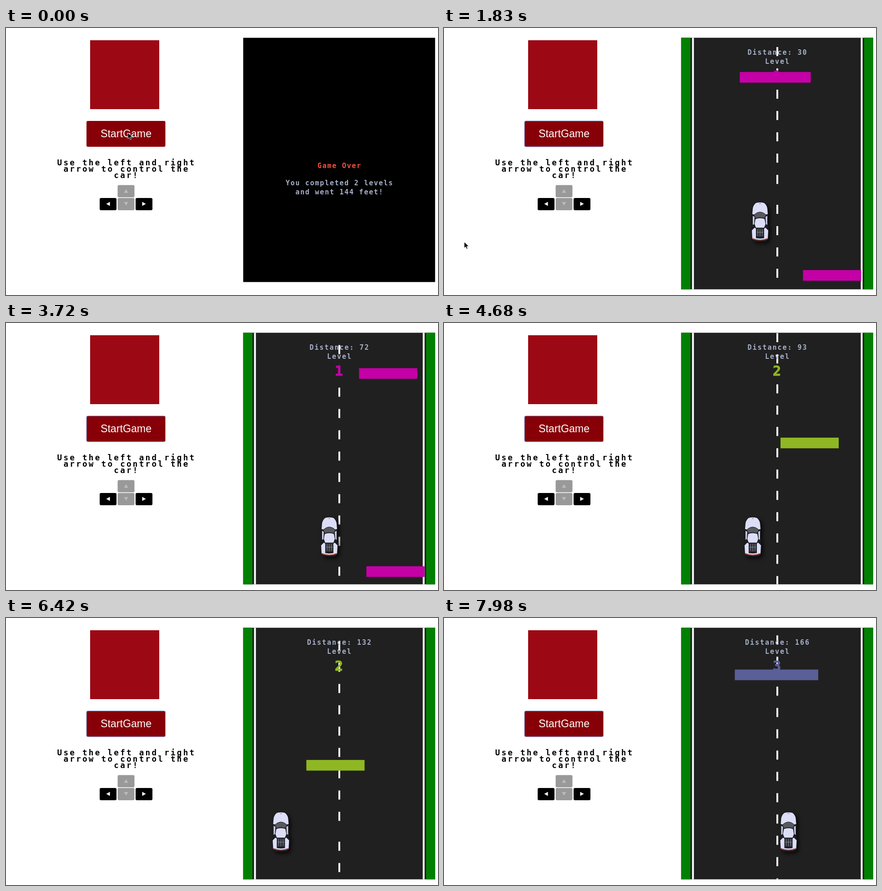
Animation of 950 by 589 pixels, one loop 8 s. Source, as an HTML page:

```html
<!DOCTYPE html>
<html lang="en">
<head>
<meta charset="utf-8">
<title>Racing game</title>
<style>
  html, body { margin: 0; width: 100%; height: 100%; overflow: hidden; background: #fff; }
  svg { display: block; width: 950px; height: 589px; }
  text { text-anchor: middle; white-space: pre; }
  .pixel { font: bold 15px "DejaVu Sans Mono", monospace; letter-spacing: 1.97px; fill: #a6b0c8; }
  .over { letter-spacing: 1.75px; }
  .help { font-size: 17.5px; letter-spacing: 3.32px; fill: #000; }
  .number { font: bold 30px "DejaVu Sans Mono", monospace; stroke-width: 1px; }
  .start { font: 23.2px "Liberation Sans", Arial, sans-serif; fill: #fff; }
  #car { filter: drop-shadow(4px 4px 4px rgba(0, 0, 0, .75)); }
</style>
</head>
<body>
<svg viewBox="0 0 950 589">
  <defs><clipPath id="screen"><rect x="521.6" y="21.6" width="422" height="555"/></clipPath></defs>

  <rect x="185" y="27" width="152" height="152" fill="#9c0914"/>
  <rect id="button" x="177" y="205" width="173.5" height="57" rx="3" fill="#870007"/>
  <text class="start" x="264" y="241">StartGame</text>
  <text class="pixel help" x="265" y="303">Use the left and right</text>
  <text class="pixel help" x="265" y="317">arrow to control the</text>
  <text class="pixel help" x="265" y="331">car!</text>
  <g id="keys"></g>

  <g id="over">
    <rect x="521.6" y="21.6" width="422" height="538.8"/>
    <text class="pixel over" x="733.5" y="309" style="fill:#f8513c">Game Over</text>
    <text class="pixel over" x="733.5" y="347">You completed 2 levels</text>
    <text class="pixel over" x="733.5" y="367">and went 144 feet!</text>
  </g>

  <g id="game" clip-path="url(#screen)">
    <rect x="521" y="21" width="423" height="556" fill="#202020"/>
    <path d="M521 21H541.800V577H521zM924 21H944V577H924z" fill="#008000"/>
    <path d="M545.500 21h4v556h-4zM916.500 21h4v556h-4z" fill="#fff"/>
    <g id="dashes" fill="#fff"></g>
    <g id="bars"></g>
    <text id="distance" class="pixel" x="733.5" y="59"></text>
    <text class="pixel" x="733.5" y="79">Level</text>
    <text id="level" class="number" x="732" y="116"></text>
    <g id="car">
      <path d="M10 1Q19-2 28 1Q35 5 36 14L37 28L35 42L38 58L37 80Q34 87 28 87H10Q4 87 1 80L0 58L3 42L1 28L2 14Q3 5 10 1Z" fill="#1b1b22"/>
      <path d="M10 1.500Q19-1 28 1.500Q34 6 35 14L36 26L32 27Q19 15 6 27L2 26L3 14Q4 6 10 1.500Z" fill="#dcdef8"/>
      <path d="M6 28Q19 16 32 28L28 35Q19 31 10 35Z" fill="#58595d"/>
      <path d="M9 37Q19 33 29 37L31 48L28 56H10L7 48Z" fill="#dcdef8"/>
      <path d="M3 30L7 32L6 48L3 50ZM35 30L31 32L32 48L35 50Z" fill="#c9cbe4"/>
      <path d="M1 62L7 56L10 58V79L19 80L28 79V58L31 56L37 62L36 80Q19 86 2 80Z" fill="#dcdef8"/>
      <path d="M11 58H27V76H11Z" fill="#303138"/>
      <path d="M14 59v15M19 59v16M24 59v15M12 66h14" stroke="#888b98" fill="none"/>
      <path d="M2 80Q19 87 36 80" stroke="#a84a3c" stroke-width="2" fill="none"/>
      <path d="M17 3h4" stroke="#70728a"/>
    </g>
  </g>

  <path id="cursor" d="M0 0V13.500L3.200 10.600L5.300 15.500L7.600 14.500L5.500 9.700H10Z" fill="#000" stroke="#fff" stroke-width=".8"/>
</svg>
<script>
const $ = id => document.getElementById(id);
const LOOP = 8000, STEP = 30, CLICK = 180, START = 440, HIDE_CURSOR = 1860;
const FEET_PER_MS = 0.0221, STEER_SPEED = 0.5;
const TOP = 22, DASH = 47, DASHES = 12, DASH_LOOP = 583, BAR_WIDTH = 128;

// Each level sends [left, width] bars at an even gap, after a lead, in pixels of road.
const LEVELS = [
  { start: START, lead: -7, gap: 437, color: '#c400a6',
    bars: [[760], [789.5], [650.5, 156], [557, 204], [792.5], [776.5]] },
  { start: 4147, lead: 212, gap: 488, color: '#8fb723',
    bars: [[740], [670.5, 162], [710], [660.5], [562], [586]] },
  { start: 7757, lead: 120, gap: 488, color: '#5a5f98', bars: [[639.5, 183.5]] }
];
const speed = level => 0.695 + 0.181 * level;

// [time, goal]
const STEERING = [[1880, 605], [2526, 766], [3120, 660], [3640, 692], [4100, 660],
  [5200, 603], [5640, 585.5], [6650, 738.5]];

const clamp = (v, lo, hi) => Math.min(hi, Math.max(lo, v));
const mix = (a, b, k) => a + (b - a) * k;
const progress = (t, from, to) => clamp((t - from) / (to - from), 0, 1);
const easeOut = k => 1 - (1 - k) ** 3;
const overshoot = k => 1 + 2.7 * (k - 1) ** 3 + 1.7 * (k - 1) ** 2;

function roadAt(t) {
  return LEVELS.reduce((road, { start }, i) => {
    const end = LEVELS[i + 1]?.start ?? LOOP;
    return road + speed(i) * (clamp(t, start, end) - start);
  }, 0);
}

function carX(t) {
  return STEERING.reduce((x, [from, goal], i) => {
    const end = STEERING[i + 1]?.[0] ?? LOOP;
    const reach = STEER_SPEED * (clamp(t, from, end) - from);
    return x + clamp(goal - x, -reach, reach);
  }, 676);
}

function add(parent, tag, attrs) {
  const el = document.createElementNS('http://www.w3.org/2000/svg', tag);
  for (const name in attrs) el.setAttribute(name, attrs[name]);
  return parent.appendChild(el);
}

const move = (el, x, y) => el.setAttribute('transform', `translate(${x} ${y})`);
const show = (el, on) => { el.style.display = on ? '' : 'none'; };

function addKey(x, y, turn, active) {
  add($('keys'), 'rect', { x, y, width: 37, height: 27, rx: 3, fill: active ? '#000' : '#999' });
  add($('keys'), 'path', {
    d: 'M-4.5 4L0-4L4.5 4Z', fill: active ? '#fff' : '#bbb',
    transform: `translate(${x + 18.5} ${y + 13}) rotate(${turn})`
  });
}
addKey(245.5, 346.5, 0, false);
addKey(206, 375, -90, true);
addKey(245.5, 375, 180, false);
addKey(285, 375, 90, true);

const dashes = Array.from({ length: DASHES }, () =>
  add($('dashes'), 'rect', { x: 731, width: 4, height: 20 }));

const bars = LEVELS.flatMap(({ start, lead, gap, bars }) =>
  bars.map(([x, width = BAR_WIDTH], i) => ({
    el: add($('bars'), 'rect', { x, width, height: 23.5 }),
    entry: roadAt(start) + lead + i * gap
  })));

function draw(t) {
  const playing = t >= START;
  show($('over'), !playing);
  show($('game'), playing);
  $('button').setAttribute('stroke', t >= CLICK ? '#75a5e4' : 'none');

  const k = progress(t, START, 820);
  show($('cursor'), t < HIDE_CURSOR);
  move($('cursor'), mix(268, 44.5, overshoot(k)), mix(231, 472, easeOut(k)));
  if (!playing) return;

  const road = roadAt(t);
  const level = LEVELS.findLastIndex(({ start }) => t >= start);
  const { color } = LEVELS[level];

  // The dashes wrap with a wider gap between the last and the first.
  dashes.forEach((dash, i) => {
    const y = road + 502 + (DASHES - i) * DASH - DASHES * DASH + DASH_LOOP;
    dash.setAttribute('y', TOP + y % DASH_LOOP);
  });
  bars.forEach(({ el, entry }) => el.setAttribute('y', road - entry - 2));
  for (const id of ['bars', 'level']) $(id).setAttribute('fill', color);
  $('level').setAttribute('stroke', color);
  $('level').textContent = level + 1;
  $('distance').textContent = `Distance: ${Math.floor((t - START) * FEET_PER_MS)}`;
  move($('car'), carX(t), mix(384.5, 428.5, progress(t, 3100, 3200)));
}

const begin = performance.now();
function tick() {
  const t = (performance.now() - begin) % LOOP;
  draw(Math.floor(t / STEP) * STEP);
  requestAnimationFrame(tick);
}
draw(0);
requestAnimationFrame(tick);
</script>
</body>
</html>
```
